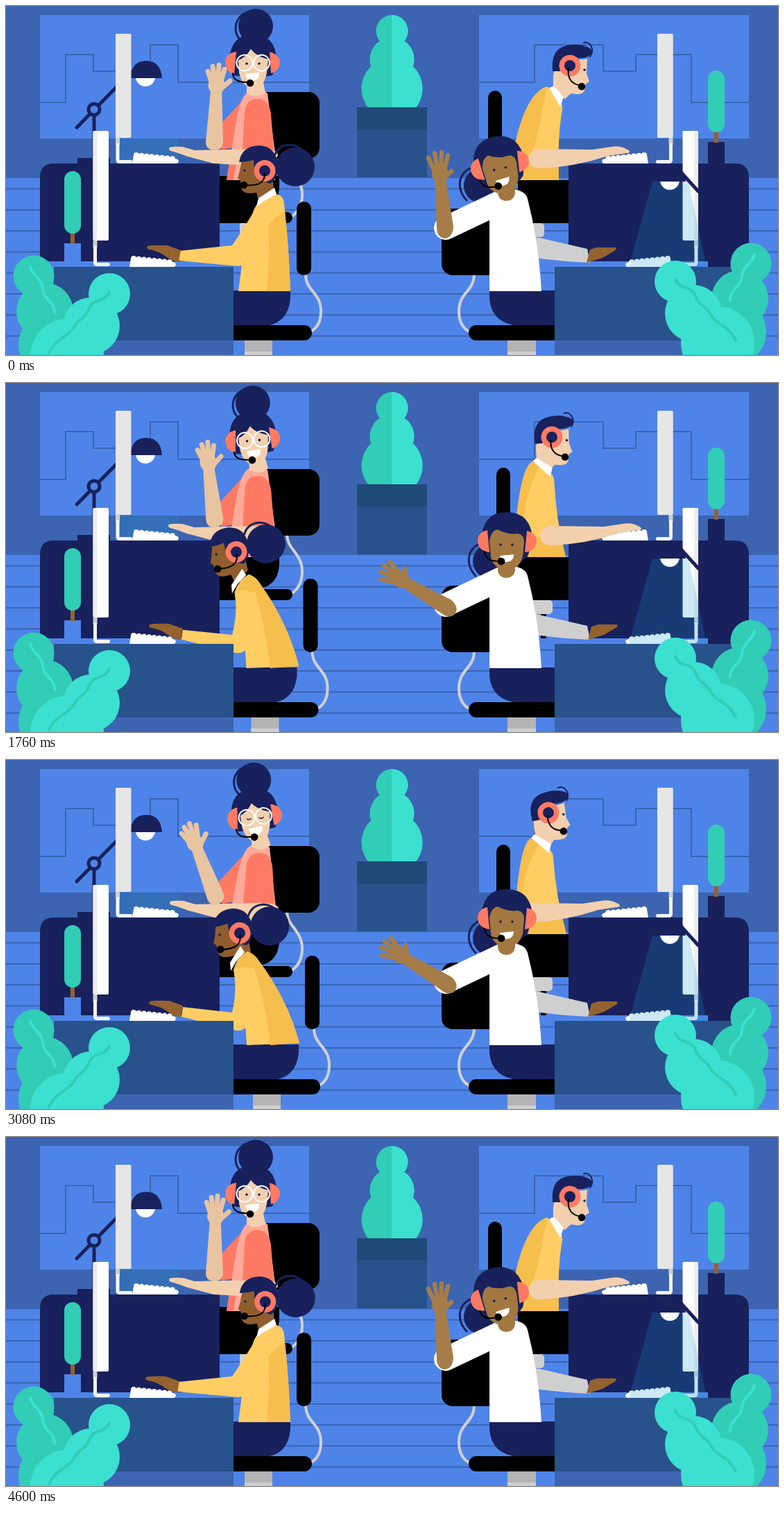
Animation of 1113x503 px, one loop 4.64 s. Source, as an HTML page:

```html
<!DOCTYPE html>
<html lang="en">
<head>
<meta charset="utf-8">
<title>Support team at work</title>
<style>
html, body { margin: 0; width: 100%; height: 100%; overflow: hidden; background: #3c64b1; }
svg { display: block; width: 100%; height: 100%; }
.navy { fill: #18215c; } .black { fill: #000; } .white { fill: #fff; }
.coral { fill: #ff7a64; } .pink { fill: #ffa99a; }
.sun { fill: #ffcd63; } .gold { fill: #f6be4c; }
.fair { fill: #f2d0ae; } .tan { fill: #e8c4a0; }
.brown { fill: #a27840; } .limb { fill: #a67d48; } .umber { fill: #8f5d2e; } .hand { fill: #94622f; }
.green { fill: #31cdb6; } .mint { fill: #3be0d0; }
.desk { fill: #28528b; } .wall { fill: #3c64b1; } .sky { fill: #4e84e8; }
.grey { fill: #cfcfcf; } .glow { fill: #1897d2; opacity: .22; }
.line { fill: none; stroke-linecap: round; stroke-linejoin: round; }
.hair { stroke: #18215c; stroke-width: 3; }
.wire { stroke: #000; stroke-width: 2; }
.hose { stroke: #cfd0d2; stroke-width: 4; }
.rule { stroke: #3c64b1; stroke-width: 2; stroke-linecap: butt; stroke-linejoin: miter; }
</style>
</head>
<body>
<svg viewBox="0 0 1113 503" preserveAspectRatio="none" xmlns="http://www.w3.org/2000/svg">
  <defs>
    <g id="keys"></g>
    <g id="leaves">
      <g class="green">
        <circle cx="40" cy="389" r="29.5"/><circle cx="56" cy="440" r="41"/><circle cx="66" cy="488" r="48"/>
      </g>
      <path class="line" stroke="#3be0d0" stroke-width="4" d="M35 376C38 390 52 392 53 408S70 424 70 442"/>
      <g class="mint">
        <circle cx="149" cy="415" r="30"/><circle cx="123" cy="461" r="41"/><circle cx="88" cy="504" r="53"/>
      </g>
      <path class="line" stroke="#31cdb6" stroke-width="4" d="M149 412C143 428 126 420 120 436S104 450 98 463S72 478 62 500"/>
    </g>
    <clipPath id="plantTop"><rect x="500" y="0" width="120" height="147"/></clipPath>
    <clipPath id="plantRight"><rect x="556" y="0" width="60" height="147"/></clipPath>
    <g id="bush"><circle cx="556.5" cy="36" r="23"/><circle cx="556.5" cy="77" r="32"/><circle cx="556.5" cy="119" r="44"/></g>
  </defs>

  <!-- room -->
  <rect class="wall" width="1113" height="503"/>
  <rect class="sky" y="248" width="1113" height="255"/>
  <g id="boards"></g>
  <path class="sky" d="M49 13H437V191H49ZM682 13H1071V191H682Z"/>
  <path class="line rule" d="M49 139H86V70H126V94H208V56H248V110H437M682 110H762V56H861V94H908V70H988V139H1071"/>
  <use href="#bush" class="green" clip-path="url(#plantTop)"/>
  <use href="#bush" class="mint" clip-path="url(#plantRight)"/>
  <rect class="desk" x="506" y="146" width="101" height="101"/>
  <rect x="506" y="146" width="101" height="32" fill="#204a78"/>

  <!-- back left desk lamp and screen -->
  <path class="glow" d="M160 191H249V227H160Z"/>
  <path class="line" stroke="#18215c" stroke-width="5" d="M102 175L165 111M127 158V222"/>
  <circle cx="127" cy="149" r="8" fill="#4e84e8" stroke="#18215c" stroke-width="5"/>
  <rect class="navy" x="103" y="219" width="47" height="9"/>
  <circle class="white" cx="201" cy="102" r="14"/>
  <path class="navy" d="M179 104Q181 79 202 79Q223 79 225 104Z"/>
  <g id="screenA"></g>

  <!-- coral woman, seat -->
  <path class="line hose" d="M405 218C405 240 427 245 427 272C427 288 420 298 411 304"/>
  <rect class="black" x="360" y="124" width="92" height="96" rx="16"/>
  <path class="black" d="M300 245H394V262Q392 297 355 297H300Z"/>
  <rect class="black" x="295" y="297" width="118" height="16" rx="8"/>
  <rect class="grey" x="337" y="313" width="38" height="20"/>
  <path class="navy" d="M49 368V247Q49 227 69 227H308V368Z"/>
  <use href="#keys" x="182" y="211"/>

  <!-- coral woman -->
  <g id="bodyA">
    <path class="coral" d="M350 126L304 176Q298 200 312 207L332 203L352 175Z"/>
    <path class="pink" d="M350 123Q370 119 377 126L388 212V251H318L332 165Q338 130 350 123Z"/>
    <path class="coral" d="M344 155Q345 134 362 134Q379 134 382 155L386 208H341ZM318 251L322 226H332L328 251Z"/>
  </g>
  <path id="forearmA" class="fair" d="M235 205Q236 202 255 203L272 208L360 206Q392 205 392 215Q388 227 355 230L300 227L262 217Q246 211 238 209Q235 208 235 205Z"/>
  <g id="armA">
    <path class="tan" d="M295 122L311 122L313 196Q312 208 300 208Q288 207 288 196Z"/>
    <ellipse class="tan" cx="303.5" cy="114" rx="12" ry="13"/>
    <path class="line" stroke="#e8c4a0" stroke-width="7" d="M297 112L291 94M301 110L298 87M305 110L307 85M309 112L315 91M310 119L323 108"/>
  </g>
  <g id="headA">
    <path class="fair" d="M347 105H370L374 125Q360 134 347 125Z"/>
    <circle class="line hair" cx="355" cy="32" r="24"/>
    <circle class="navy" cx="360" cy="29" r="25"/>
    <path class="navy" d="M322 78Q324 41 356 41Q389 41 390 78L384 100L360 104L328 100Z"/>
    <path class="fair" d="M335 78Q346 74 353 62Q360 72 378 77L376 96Q372 119 355 118Q340 116 336 96Z"/>
    <path class="coral" d="M332 66Q316 68 316 82Q317 96 329 98ZM380 66Q395 70 395 82Q394 94 382 97Z"/>
    <g fill="none" stroke="#fff" stroke-width="2"><circle cx="344" cy="82" r="11.5"/><circle cx="368.5" cy="82" r="11.5"/><path d="M355 81Q356 79 358 81"/></g>
    <g id="openA" class="navy"><circle cx="347" cy="83" r="1.8"/><circle cx="365" cy="83" r="1.8"/></g>
    <path id="shutA" class="line" stroke="#18215c" stroke-width="1.5" d="M344 84Q347 86 350 84M362 84Q365 86 368 84"/>
    <path class="white" d="M345 98L365 96Q366 107 355 108Q346 107 345 98Z"/>
    <path class="line wire" d="M327 97Q327 111 352 110"/><circle cx="352" cy="111" r="5.3"/>
  </g>

  <!-- seated man -->
  <g id="chairC">
    <rect class="black" x="695" y="122" width="20" height="106" rx="10"/>
    <rect class="grey" x="740" y="313" width="36" height="20" rx="5"/>
    <rect class="black" x="759" y="333" width="8" height="35"/>
  </g>
  <rect class="black" x="738" y="251" width="80" height="62"/>
  <path class="navy" d="M811 368V227H1051Q1071 227 1071 247V368Z"/>
  <rect class="navy" x="1012" y="196" width="24" height="33"/>
  <rect x="1021" y="180" width="6" height="17" fill="#94622f"/>
  <rect class="green" x="1012" y="93" width="24" height="89" rx="12"/>
  <g id="screenC"></g>
  <use href="#keys" transform="translate(926 211) scale(-1 1)"/>
  <g id="headC">
    <path class="fair" d="M794 82L838 76L837 97L841 109L836 112L834 122Q831 128 822 127L814 126L806 134L790 122Q786 100 794 82Z"/>
    <path class="navy" d="M788 94Q785 62 808 57Q826 54 835 58Q846 61 845 68Q840 76 824 75L813 90L798 94Z"/>
    <path class="line" stroke="#18215c" stroke-width="2" d="M833 53C843 50 849 64 842 73"/>
    <circle class="coral" cx="813" cy="86" r="15.5"/><circle class="navy" cx="813" cy="86" r="8"/>
    <circle id="openC" class="navy" cx="834" cy="92" r="1.8"/>
    <path id="shutC" class="line" stroke="#18215c" stroke-width="1.5" d="M831 92Q834 94 837 92"/>
    <path class="line wire" d="M811 90Q808 112 830 115"/><circle cx="830" cy="116" r="5.3"/>
  </g>
  <path id="bodyC" class="sun"/><path id="shadeC" class="gold"/><path id="collarC" class="white"/>
  <path id="armC" class="fair" d="M753 220Q755 206 770 206L845 207L872 203Q882 201 890 204L898 208Q901 212 895 212L868 216Q820 232 770 234Q754 234 753 220Z"/>

  <!-- front left desk -->
  <rect class="sky" x="84" y="342" width="24" height="34"/>
  <rect x="93" y="326" width="6" height="17" fill="#94622f"/>
  <rect class="green" x="84" y="238" width="24" height="90" rx="12"/>
  <g id="screenD"></g>
  <use href="#keys" x="178" y="360"/>

  <!-- woman at front left -->
  <g id="chairD">
    <path class="line hose" d="M432 386C432 412 454 412 454 440C454 455 448 465 438 470"/>
    <rect class="black" x="419" y="282" width="21" height="106" rx="10"/>
    <path fill="#b4b4b4" d="M344 480H384V503H344Z"/><path class="grey" d="M344 498H384V503H344Z"/>
    <path class="navy" d="M290 410H410V422Q406 461 368 461H290Z"/>
    <rect class="black" x="280" y="460" width="161" height="22" rx="11"/>
  </g>
  <g id="headD">
    <path class="line hair" d="M388 214Q394 200 410 200Q420 201 426 207"/>
    <circle class="navy" cx="417" cy="232" r="28"/>
    <path class="umber" d="M341 216L337 238L334 248L338 252L339 262Q341 270 352 270L361 269L365 282L386 266L384 240L362 212Z"/>
    <path class="navy" d="M336 225Q340 201 366 201Q390 203 392 230Q391 252 380 256L366 250Q357 240 357 222Q346 225 336 225Z"/>
    <circle class="coral" cx="373" cy="237.5" r="15.5"/><circle class="navy" cx="373" cy="237.5" r="8"/>
    <circle class="navy" cx="344" cy="237" r="1.8"/>
    <path class="line wire" d="M373 241Q374 261 344 258"/><circle cx="343" cy="258" r="5.3"/>
  </g>
  <path id="bodyD" class="sun"/><path id="shadeD" class="gold"/><path id="collarD" class="white"/>
  <path id="sleeveD" class="sun"/>
  <path id="handD" class="hand" d="M203 347Q205 344 232 345L252 352L249 368Q240 368 232 362Q220 353 207 351Q203 350 203 347Z"/>
  <rect class="desk" x="69" y="376" width="259" height="106"/>
  <rect class="wall" x="69" y="482" width="259" height="21"/>

  <!-- front right desk -->
  <rect class="navy" x="1012" y="366" width="33" height="10"/>
  <g id="screenB"></g>
  <path class="line" stroke="#18215c" stroke-width="5" d="M968 234L998 267"/>
  <use href="#keys" transform="translate(960 360) scale(-1 1)"/>
  <path class="glow" d="M932 253H984L1010 376H898Z"/>
  <circle class="white" cx="957" cy="251" r="14"/>
  <path class="navy" d="M934 253Q936 229 957 229Q978 229 980 253Z"/>

  <!-- waving woman at front right -->
  <path class="line hose" d="M675 386C675 412 653 412 653 440C653 455 659 465 669 470"/>
  <rect class="black" x="628" y="292" width="100" height="96" rx="16"/>
  <path fill="#b4b4b4" d="M723 480H764V503H723Z"/><path class="grey" d="M723 498H764V503H723Z"/>
  <path class="navy" d="M697 410H800V461H740Q700 458 697 422Z"/>
  <rect class="black" x="667" y="460" width="150" height="22" rx="11"/>
  <rect class="desk" x="791" y="376" width="259" height="106"/>
  <rect class="wall" x="791" y="482" width="259" height="21"/>
  <path class="grey" d="M755 331L838 350L842 370Q800 368 755 362Z"/>
  <path id="handB" class="hand" d="M837 370L842 351L852 348L878 348Q882 350 877 353L860 363Z"/>
  <g id="bunB"><circle class="navy" cx="685" cy="259" r="25"/><path class="line hair" d="M664 280C647 262 652 234 681 231"/></g>
  <path class="line" stroke="#fff" stroke-width="34" d="M634 320L714 282"/>
  <path class="white" d="M697 411V278Q704 265 722 264Q748 263 752 278Q768 340 772 411Z"/>
  <g id="armB">
    <path class="limb" d="M618 248L634 248L645 318Q644 334 632 335Q621 333 621 320Z"/>
    <ellipse class="limb" cx="626" cy="242" rx="12" ry="13"/>
    <path class="line" stroke="#a67d48" stroke-width="6.5" d="M619 240L609 219M623 238L618 212M627 238L628 211M631 240L637 215M631 249L642 238"/>
  </g>
  <path class="brown" d="M709 255H734V270Q732 281 721 281Q710 280 709 270Z"/>
  <g id="headB">
    <path class="navy" d="M685 229Q686 186 722 186Q759 187 759 229L752 250L738 262H706L692 250Z"/>
    <path class="brown" d="M697 228Q699 213 709 211Q722 219 738 217Q747 218 747 230L745 250Q740 269 722 269Q702 268 699 250Z"/>
    <path class="coral" d="M694 212Q680 215 680 228Q681 242 697 244ZM751 213Q765 216 765 229Q764 242 748 244Z"/>
    <circle class="navy" cx="713" cy="233" r="1.8"/><circle class="navy" cx="730" cy="233" r="1.8"/>
    <path class="white" d="M712 249L732 247Q732 257 722 258Q713 258 712 249Z"/>
    <path class="line wire" d="M690 243Q691 258 714 257"/><circle cx="714" cy="257" r="5.3"/>
  </g>

  <use href="#leaves"/>
  <use href="#leaves" transform="translate(1114 -18) scale(-1 1)"/>
</svg>
<script>
const LOOP = 4640, STEP = 40;
const $ = id => document.getElementById(id);

// Static repeats
const range = n => [...Array(n).keys()];
$('boards').innerHTML = range(8).map(i =>
  `<rect class="wall" y="${262.5 + i * 30.3}" width="1113" height="2"/>`).join('');
$('keys').innerHTML = '<path class="white" d="M0 16L2 4L60 9Q67 9 67 13L65 16Z"/>' + range(8).map(i =>
  `<circle class="white" cx="${6 + i * 7.4}" cy="${4 + i * 0.75}" r="4"/>`).join('');

function screen(id, x, y, height, fill, edge, flip = 1) {
  $(id).innerHTML = `<g transform="translate(${x} ${y}) scale(${flip} 1)">
    <rect width="22.5" height="${height}" rx="2" fill="${fill}"/>
    <rect width="6" height="${height}" rx="2" fill="${edge}"/>
    <rect y="${height}" width="6" height="10" fill="#cfcfcf"/>
    <path class="line" stroke="#f4f4f4" stroke-width="5" stroke-linecap="butt" d="M3 ${height + 10}V${height + 32}Q3 ${height + 34.5} 6 ${height + 34.5}H22"/></g>`;
}
screen('screenA', 158, 40, 150, '#e6e6e6', '#e6e6e6');
screen('screenC', 961.5, 40, 150, '#e6e6e6', '#e6e6e6', -1);
screen('screenD', 125.5, 180, 158, '#fff', '#ededed');
screen('screenB', 998, 180, 158, '#fff', '#ededed', -1);

// A track is "time value" pairs, eased between neighbours and closed over the loop
function track(text) {
  const n = text.split(' ').map(Number), keys = [];
  for (let i = 0; i < n.length; i += 2) keys.push([n[i], n[i + 1]]);
  keys.push([LOOP, keys[0][1]]);
  return t => {
    const i = keys.findIndex(k => k[0] > t);
    const [t0, a] = keys[i - 1], [t1, b] = keys[i];
    return a + (b - a) * (1 - Math.cos(Math.PI * (t - t0) / (t1 - t0))) / 2;
  };
}

const m = {
  swayA: track('0 0 720 5 1760 .4 2640 1.9 3080 3 3720 1.7 4600 0'),
  tiltA: track('0 0 720 -2 1760 -5 2640 -6.4 3080 -6.2 3720 -.8 4600 0'),
  waveA: track('0 0 650 -24.5 760 -24 1400 -9 1760 -8.5 2240 -1 2640 -18 2980 -24 3080 -23 3720 -8 4600 -1'),
  typeA: track('0 0 720 3 1200 0 1760 -1 2640 1 3080 1 3720 2 4600 0'),
  waveB: track('0 0 640 0 720 -4 1100 -53 1760 -54 2250 0 2640 0 3060 -53 3720 -55 4220 0'),
  tiltB: track('0 1 660 1 720 .97 1100 0 1760 0 2250 1 2640 1 3060 0 3720 0 4220 1'),
  typeB: track('0 0 720 -1 1100 2 1760 2 2640 0 3080 2 3720 2 4600 0'),
  leanC: track('0 0 80 0 720 .74 1760 .9 2640 1 3100 1 3700 0'),
  headXC: track('0 0 80 0 720 -24 1760 -26 2640 -32 3100 -31 3720 1 4600 0'),
  headYC: track('0 0 80 0 720 -5 1760 -8 2640 -8 3100 -10 3720 0'),
  tiltC: track('0 0 720 -13 1760 -4 2640 -19 3080 -10 3720 0'),
  chairC: track('0 0 200 0 1500 12 3100 12 3760 1.5 4600 0'),
  typeC: track('0 0 300 -12 720 5 1000 12 1400 19 1760 17 2000 20 2400 0 2640 -2 3080 -14 3360 1 3720 10 4150 20 4600 0'),
  leanD: track('0 0 1100 0 1740 .95 2300 1 3740 1 4580 0'),
  headXD: track('0 0 720 -1 1100 -1 1740 -41 2640 -40 3080 -36 3740 -39 4580 1'),
  headYD: track('0 0 1100 0 1760 6 2640 13 3080 12 3720 7 4580 0'),
  tiltD: track('0 0 1100 0 1740 -8 2640 -6 3740 -6 4580 0'),
  chairD: track('0 0 1120 0 1760 9.5 2500 12 3740 12 4580 0'),
  typeD: track('0 0 720 1 900 -6 1150 2 1450 -6 1760 3 2000 8 2430 -6 2640 11 2850 -6 3080 3 3240 -6 3420 13 3720 16 3920 12 4250 -6 4600 -2')
};

// Pairs of poses: upright or reaching, and leaning
const pose = {
  bodyC: ['M780 116L795 130Q803 138 802 150Q795 185 797 251L736 251Q730 215 736 190Q752 125 780 116Z',
          'M757 113L772 122Q788 128 789 140Q793 200 808 251L738 251Q732 225 737 185Q744 118 757 113Z'],
  shadeC: ['M780 116Q752 125 736 190Q730 215 736 251L797 251L796 222L757 222Q758 205 764 195Q774 150 780 116Z',
           'M757 113Q744 118 737 185Q732 225 738 251L808 251L801 222L742 222Q742 210 745 190Q750 150 768 121Z'],
  collarC: ['M783 118L790 115L804 131L799 145Z', 'M757 112L762 107L786 121L783 134Z'],
  bodyD: ['M358 292Q368 274 388 271Q400 272 401 285Q408 350 410 411L335 411Q342 360 344 330Z',
          'M328 302Q334 284 348 276Q358 279 365 290Q406 345 423 408L347 411Q346 370 332 330Z'],
  shadeD: ['M378 318Q384 308 390 304Q398 300 402 295Q408 350 410 411L376 411Q381 350 378 318Z',
           'M329 300Q334 284 348 276Q358 279 365 290Q406 345 423 408L381 411Q374 350 358 300Z'],
  collarD: ['M361 289L364 277L387 262L390 271L372 281Z', 'M324 304L323 292L338 268L344 277L332 290Z'],
  sleeveD: ['M360 292Q340 325 326 345L250 353L249 367L335 375Q350 373 358 354L377 316Q378 284 360 292Z',
            'M330 312Q332 340 326 364L252 356L250 370L332 390Q348 391 350 374L366 330Q358 292 334 300Z']
};
const num = /-?\d+(\.\d+)?/g;
function mix([a, b], k) {
  const to = b.match(num);
  let i = 0;
  return a.replace(num, v => (+v + (to[i++] - v) * k).toFixed(2));
}

const place = (id, value) => $(id).setAttribute('transform', value);
const shift = (id, x, y = 0) => place(id, `translate(${x} ${y})`);
const turn = (id, x, y, angle, cx, cy) => place(id, `translate(${x} ${y}) rotate(${angle} ${cx} ${cy})`);
function blink(who, shut) {
  $('open' + who).style.display = shut ? 'none' : '';
  $('shut' + who).style.display = shut ? '' : 'none';
}

function draw(t) {
  const v = {};
  for (const key in m) v[key] = m[key](t);

  const skew = v.swayA / 126;
  place('bodyA', `matrix(1 0 ${-skew} 1 ${251 * skew} 0)`);
  turn('armA', v.swayA * 0.45, 0, v.waveA, 301, 196);
  turn('headA', v.swayA, 0, v.tiltA, 355, 82);
  shift('forearmA', v.typeA);
  blink('A', Math.abs(t - 3080) <= 80);

  const out = 1 - v.tiltB;
  turn('armB', out * 5, out * 3, v.waveB, 632, 322);
  turn('headB', -10.5 * v.tiltB, 1.5 * v.tiltB, -12 * v.tiltB, 722, 228);
  shift('bunB', out * 13, out * -2);
  shift('handB', v.typeB);

  turn('headC', v.headXC, v.headYC, v.tiltC, 813, 86);
  shift('chairC', v.chairC);
  shift('armC', v.typeC);
  blink('C', Math.abs(t - 720) <= 80);

  turn('headD', v.headXD, v.headYD, v.tiltD, 373, 237.5);
  shift('chairD', v.chairD);
  shift('handD', v.typeD, v.leanD * 2);

  for (const id in pose) {
    let d = mix(pose[id], id.endsWith('C') ? v.leanC : v.leanD);
    if (id === 'sleeveD') {
      // the two cuff points follow the hand
      let n = 0;
      d = d.replace(/L(-?[\d.]+)/g, (s, x) => ++n < 3 ? 'L' + (+x + v.typeD) : s);
    }
    $(id).setAttribute('d', d);
  }
}

function tick() {
  draw(Math.floor(performance.now() % LOOP / STEP) * STEP);
  requestAnimationFrame(tick);
}
tick();
</script>
</body>
</html>
```
